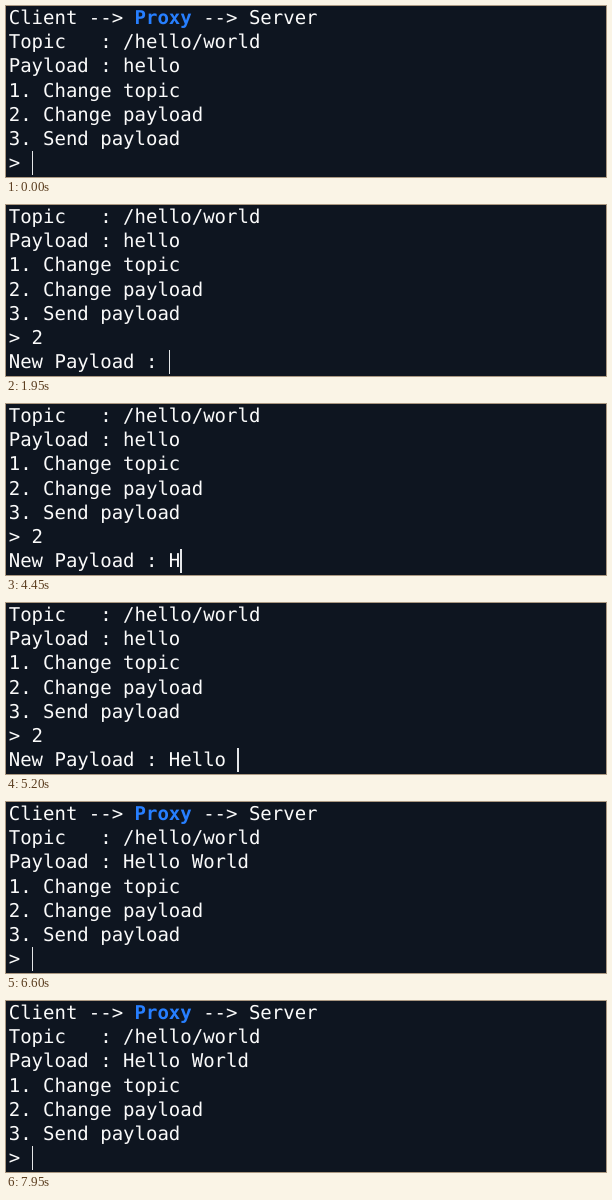
Animation, 600 px wide and 171 px high, one loop 8 s. Source, as an HTML page:

```html
<!DOCTYPE html>
<html lang="en">
<head>
<meta charset="utf-8">
<style>
  html, body { margin: 0; width: 100%; height: 100%; overflow: hidden; background: #0e1520; }
  pre {
    position: absolute; left: 2.7px; top: 0; margin: 0;
    font: 19px/24.2px "DejaVu Sans Mono", monospace;
    color: #fafafa; text-rendering: geometricPrecision; font-variant-ligatures: none;
  }
  b { color: #277fff; }
  i { position: absolute; width: 1.4px; height: 24px; margin-top: .2px; background: #e4e6e8; }
</style>
</head>
<body>
<pre id="screen"></pre>
<script>
const LOOP = 8000, ROWS = 7, ENTER_CHOICE = 550, ENTER_PAYLOAD = 6600;
const screenEl = document.getElementById('screen');

// [time, input after the key press]
const choiceKeys = [[0, ''], [300, '2']];
const payloadKeys = [
  [0, ''], [2550, 'h'], [2900, ''], [3250, 'W'], [4100, ''],
  [4450, 'H'], [4550, 'He'], [4700, 'Hel'], [4850, 'Hell'], [5050, 'Hello'], [5200, 'Hello '],
  [5700, 'Hello W'], [5800, 'Hello Wo'], [5900, 'Hello Wor'], [6050, 'Hello Worl'], [6150, 'Hello World']
];
const typed = (keys, t) => keys.filter(([at]) => at <= t).pop()[1];

const menu = (payload, input) => [
  'Client --> <b>Proxy</b> --> Server',
  'Topic   : /hello/world',
  'Payload : ' + payload,
  '1. Change topic',
  '2. Change payload',
  '3. Send payload',
  '&gt; ' + input
];

function linesAt(t) {
  if (t >= ENTER_PAYLOAD) return menu('Hello World', '');
  const lines = menu('hello', typed(choiceKeys, t));
  if (t >= ENTER_CHOICE) lines.push('New Payload : ' + typed(payloadKeys, t));
  return lines.slice(-ROWS);
}

let shown;
function draw(now) {
  const html = linesAt(now % LOOP).join('\n') + '<i></i>';
  if (html !== shown) screenEl.innerHTML = shown = html;
  requestAnimationFrame(draw);
}
draw(performance.now());
</script>
</body>
</html>
```
